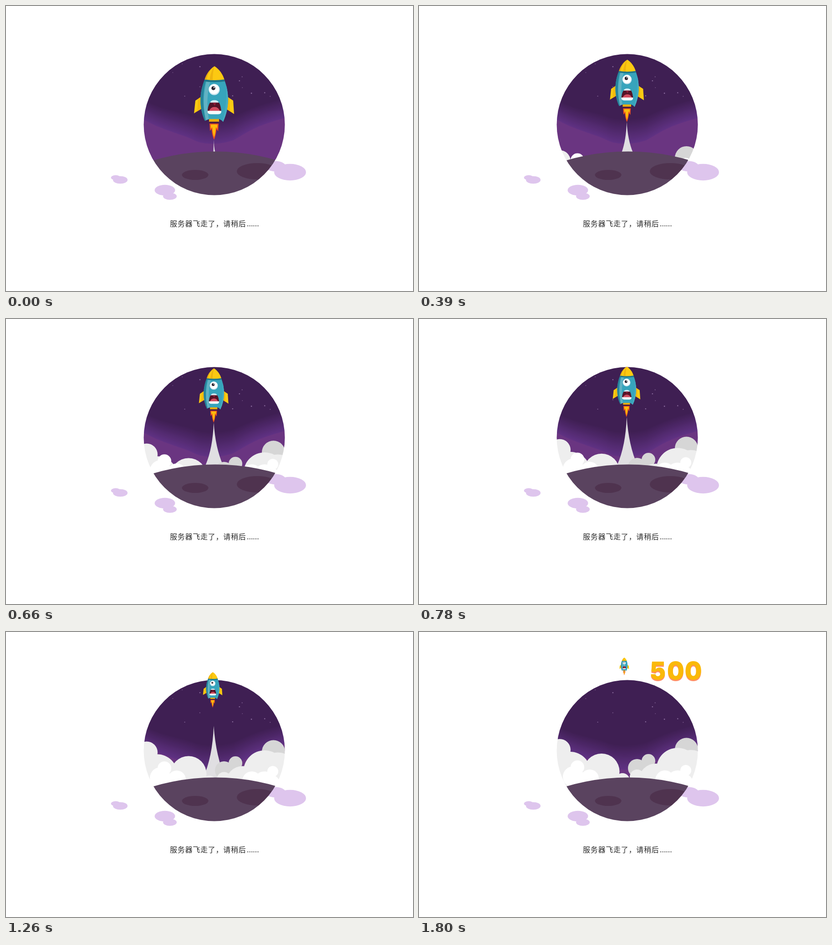
Recreate the animation shown at these times as an HTML page with a canvas. Size 894 px wide and 626 px high, loop 2130 ms.

```html
<!DOCTYPE html>
<html lang="zh-CN">
<head>
<meta charset="utf-8">
<title>500</title>
<style>
html, body { margin: 0; width: 100%; height: 100%; overflow: hidden; background: #fff; }
canvas, svg { position: absolute; left: 0; top: 0; display: block; }
.note { font: 500 16px "Noto Sans CJK SC", "Noto Sans CJK", sans-serif; fill: #2b2b2b; }
.code { font: 900 53px Inter, "Open Sans", sans-serif; text-anchor: middle; }
</style>
</head>
<body>
<canvas id="stage" width="894" height="626"></canvas>
<svg width="894" height="626">
  <text class="note" x="360" y="484" letter-spacing="0.75">服务器飞走了，请稍后</text>
  <text class="note" x="529" y="484">......</text>
  <g id="code" class="code" opacity="0">
    <text x="525 563.8 602.5" y="107.3" fill="#ff8f62">500</text>
    <text x="525 563.8 602.5" y="103.8" fill="#fab908">500</text>
  </g>
</svg>
<script>
const W = 894, H = 626;
const LOOP = 2130, STEP = 30, END = 1800;
const CX = 457.5, CY = 260.5, R = 155;

const page = document.getElementById('stage').getContext('2d');
const code = document.getElementById('code');
const layer = () => Object.assign(document.createElement('canvas'), { width: W, height: H }).getContext('2d');
const scene = layer();   // everything seen through the round window
const backdrop = layer(); // still sky
let ctx = page;

// depth: how far each layer starts below its resting place; puffs: x, y, radius
const CLOUDS = [
  { tint: '#d6d6d6', depth: 114, puffs: [[479, 299, 20], [504, 283, 15], [587.5, 258, 25.5]] },
  { tint: '#eeeeee', depth: 126, puffs: [[309, 259, 24], [332, 308, 45], [401, 306.5, 39.5],
    [447, 326, 16], [479, 318, 16], [520, 326, 37], [568, 301, 46.5], [597, 302, 43]] },
  { tint: '#ffffff', depth: 50, puffs: [[348, 297, 15], [375, 322, 20], [339, 318, 23],
    [540, 325, 21], [568, 329, 25], [586, 304, 12], [583, 330, 18]] }
];

const mix = (a, b, p) => a + (b - a) * p;
const clamp = v => Math.min(1, Math.max(0, v));

function oval(x, y, rx, ry, fill) {
  ctx.fillStyle = fill;
  ctx.beginPath();
  ctx.ellipse(x, y, rx, ry, 0, 0, Math.PI * 2);
  ctx.fill();
}
const disc = (x, y, r, fill) => oval(x, y, r, r, fill);

function shape(d, fill) {
  ctx.fillStyle = fill;
  ctx.fill(new Path2D(d));
}

function within(d, paint) {
  ctx.save();
  ctx.clip(new Path2D(d));
  paint();
  ctx.restore();
}

function blend(a, b, p) {
  return 'rgb(' + a.map((v, i) => Math.round(mix(v, b[i], p))) + ')';
}

function random(seed) {
  return () => (seed = seed * 16807 % 2147483647) / 2147483647;
}

function sky() {
  ctx.fillStyle = '#3f1f53';
  ctx.fillRect(0, 0, W, H);
  const bands = 18;
  for (let i = 1; i <= bands; i++) {
    const p = i / bands, y = mix(202, 248, p), dip = mix(44, 54, p);
    ctx.fillStyle = i === bands ? '#6a3581' : blend([63, 31, 83], [97, 50, 133], p);
    ctx.beginPath();
    ctx.moveTo(300, y);
    ctx.bezierCurveTo(340, y + 24, 385, y + dip * .6, 415, y + dip * .88);
    ctx.bezierCurveTo(440, y + dip * 1.1, 480, y + dip, 500, y + dip * .86);
    ctx.bezierCurveTo(535, y + dip * .5, 545, y + 16, 616, y - 3);
    ctx.lineTo(616, 420);
    ctx.lineTo(300, 420);
    ctx.fill();
  }
  const rnd = random(41);
  for (let i = 0; i < 17; i++) {
    disc(350 + 235 * rnd(), 122 + 90 * rnd() ** 1.5, .7 + .7 * rnd(), '#87689a');
  }
}

// Rocket pose: steady climb, faster after leaving the window
const rocketSize = t => 1 - .69 * (t / END) - .07 * (t / END) ** 2;
const rocketX = t => 457 - 6.2 * (t / END) ** 2;
const rocketY = t => 212.8 - .068 * t - .0275 * Math.max(0, t - 1260);
const flameTip = t => rocketY(t) + 80.5 * rocketSize(t);

// The trail follows the flame, then thins out and sinks
function trail(t) {
  const fade = clamp((t - 930) / 690);
  if (fade === 1) return;
  const base = 321, x = 456.2;
  const h = (base - flameTip(Math.min(t, 930))) * (1 - fade ** 4);
  const w = (2 + .026 * t) * (1 - fade ** 1.7);
  const top = base - h, bend = top + h * .6;
  ctx.fillStyle = '#e0dfe2';
  ctx.beginPath();
  ctx.moveTo(x, top);
  ctx.quadraticCurveTo(x - w * .1, bend, CX - w, base);
  ctx.lineTo(CX + w, base);
  ctx.quadraticCurveTo(x + w * .2, bend, x, top);
  ctx.fill();
}

function clouds(t) {
  const ease = (1 - t / END) ** 2.6, burst = .1 * Math.max(0, 540 - t);
  for (const { tint, depth, puffs } of CLOUDS) {
    for (const [x, y, r] of puffs) disc(x, y + depth * ease + burst, r, tint);
  }
}

function moon() {
  disc(459.5, 801.5, 482, '#5a435f');
  oval(415.5, 371, 29, 11, '#4f334f');
  oval(552, 363, 45, 18, '#4f334f');
}

function mist() {
  const puff = (x, y, r) => oval(x, y, r, r * .52, '#dec5ed');
  puff(251, 382, 16);
  puff(241, 377, 10.5);
  puff(349, 404.5, 22.5);
  puff(360, 418, 15);
  puff(624, 365, 35);
  puff(592, 352, 22);
}

const BODY = 'M437 160 C424 190 424 224 437 252 Q442 249 447 248 H468 Q473 250 477 254 C491 224 491 190 479 160 Z';
const NOSE = 'M458 132 C448 138 440 149 436.5 161 Q458 164.5 479.5 161 C476 149 468 138 458 132 Z';

function rocket(t) {
  const s = rocketSize(t);
  ctx.save();
  ctx.translate(rocketX(t), rocketY(t));
  ctx.scale(s, s);
  ctx.translate(-457, -212.5);

  // fins
  shape('M429 199 L416 207.5 L413 235.5 L430 225 Z', '#fbcb12');
  shape('M429 199 L422 203.5 L420 231 L430 225 Z', '#f3ba0d');
  shape('M486 199 L499 207.5 L501 237 L484 226 Z', '#fbcb12');
  shape('M486 199 L491 202.5 L492 231 L484 226 Z', '#f3ba0d');

  // nozzle and flame
  shape('M446 247 H468 V254 H446 Z', '#e9ad10');
  shape('M447 254 H467 V257.5 H447 Z', '#4b1c3f');
  shape('M447 258 H467 L466 275 L462.5 270 Q461 284 457 293.5 Q452.5 284 451.5 270 L448 274 Z', '#ee4f20');
  shape('M449.5 260 H464.5 L464 269 L461 266 Q460 280 457 288 Q454 280 453 266 L450 269 Z', '#fdbb0b');

  // hull
  shape(BODY, '#37a4bc');
  within(BODY, () => {
    shape('M425 160 H440 C431 190 431 226 441 256 H425 Z', '#26839a');
    shape('M442 160 H450 C441 190 440 224 447 256 H440 C432 224 433 190 442 160 Z', '#62b2c3');
    shape('M483 160 C486 196 484 228 474 256 H492 V160 Z', '#45acc2');
    shape('M430 158 H486 V164.5 Q458 169.5 430 164.5 Z', '#1f768a');
  });
  shape(NOSE, '#fcc912');
  within(NOSE, () => {
    shape('M458 131 C446 142 441 152 440 166 H430 V131 Z', '#e6a911');
    shape('M458 131 C451 142 448 152 447 166 H454 C454 152 455 142 458 131 Z', '#eeb40f');
  });

  // eye
  disc(457.3, 183.2, 12.2, '#cfe6f0');
  disc(457, 182, 10.8, '#ffffff');
  disc(455.5, 180.2, 4.3, '#2a2430');
  disc(457, 178.7, 1.3, '#ffffff');

  // mouth
  oval(457.8, 211.5, 9, 5, '#d3eaf3');
  shape('M448 212 H468 Q472 219 473 232 H442.5 Q443.5 219 448 212 Z', '#551327');
  shape('M454 212 H462 L458.5 219 Z', '#8e1f36');
  shape('M446 231 Q449 221.5 458 221.5 Q467 221.5 470 231 Z', '#d24c60');
  shape('M442.5 230 H473 Q473.5 237.5 466 237.5 H450 Q442 237.5 442.5 230 Z', '#f4fafc');
  ctx.restore();
}

function draw(ms) {
  const t = Math.min(END, Math.floor(ms / STEP) * STEP);

  ctx = scene;
  ctx.drawImage(backdrop.canvas, 0, 0);
  trail(t);
  clouds(t);
  moon();

  ctx = page;
  ctx.fillStyle = '#fff';
  ctx.fillRect(0, 0, W, H);
  mist();
  // fill the disc once so its edge carries no dark fringe
  ctx.fillStyle = ctx.createPattern(scene.canvas, 'no-repeat');
  ctx.beginPath();
  ctx.arc(CX, CY, R, 0, Math.PI * 2);
  ctx.fill();

  rocket(t);
  code.setAttribute('opacity', clamp((t - 1620) / 180));
}

ctx = backdrop;
sky();

const start = performance.now();
function tick() {
  draw((performance.now() - start) % LOOP);
  requestAnimationFrame(tick);
}
tick();
</script>
</body>
</html>
```
